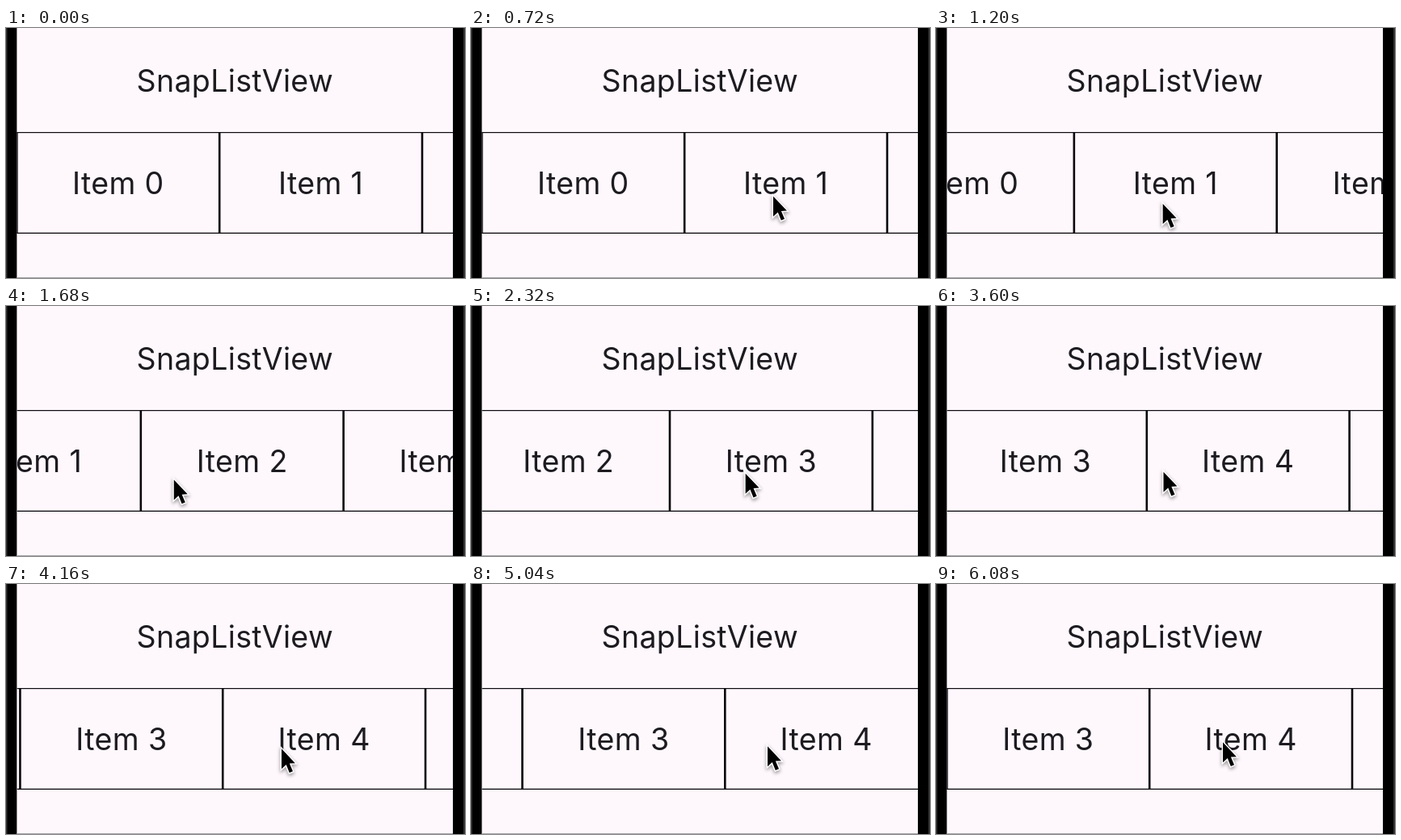
An HTML page with a canvas for the animation above (6560 ms loop, 568x310 px).

```html
<!DOCTYPE html>
<html lang="en">
<head>
<meta charset="utf-8">
<title>SnapListView</title>
<style>
html, body { margin: 0; width: 100%; height: 100%; overflow: hidden; background: #000; }
canvas { display: block; }
</style>
</head>
<body>
<canvas id="stage" width="568" height="310"></canvas>
<script>
const ctx = document.getElementById('stage').getContext('2d');
const LOOP = 6560, STEP = 80, LAST = 6080;
const LEFT = 13.4, RIGHT = 553, WIDTH = RIGHT - LEFT;
const TOP = 129, BOTTOM = 255, ITEM = 250.8;
const SURFACE = '#fef8fd', INK = '#1d1b20', LINE = '#0a080c';

// Each drag starts at pointer x, moves dx, holds, then snaps to an item edge.
const drags = [
  { at: 800, x: 374, move: 720, hold: 0, dx: -168, snap: 2, tau: 206 },
  { at: 2240, x: 368, move: 240, hold: 0, dx: -85, snap: 3, tau: 140 },
  { at: 3520, x: 285, move: 160, hold: 80, dx: -7, snap: 3, tau: 140 },
  { at: 3760, x: 278, move: 160, hold: 0, dx: 65, snap: 3, tau: 90 },
  { at: 4480, x: 317, move: 400, hold: 160, dx: 50, snap: 3, tau: 125 }
];
const ENTER = { at: 80, end: 640, x: 269, y: 298 };
const REST = { at: LAST, x: 355 };

const mix = (a, b, k) => a + (b - a) * k;
const clamp = k => Math.max(0, Math.min(1, k));
const progress = (t, from, to) => clamp((t - from) / (to - from));
const releaseOf = d => d.at + d.move + d.hold;

function scrollAt(t) {
  let scroll = 0;
  drags.forEach((d, i) => {
    if (t < d.at) return;
    const end = Math.min(t, drags[i + 1]?.at ?? LOOP);
    scroll -= d.dx * progress(end, d.at, d.at + d.move);
    const age = Math.max(0, end - releaseOf(d));
    scroll = mix(scroll, d.snap * ITEM, 1 - Math.exp(-age / d.tau));
  });
  return scroll;
}

function pointerX(t) {
  const i = drags.findLastIndex(d => d.at <= t);
  if (i < 0) return drags[0].x;
  const d = drags[i], next = drags[i + 1] ?? REST, release = releaseOf(d);
  if (t <= release) return d.x + d.dx * progress(t, d.at, d.at + d.move);
  return mix(d.x + d.dx, next.x, progress(t, release, next.at) ** 3);
}

function pointerY(t) {
  const drift = 12 * progress(t, 720, LAST) ** 2.5;
  const dip = 13 * Math.exp(-(((t - 1400) / 370) ** 2));
  return 206 - drift + dip;
}

function pointerAt(t) {
  const k = 1 - (1 - progress(t, ENTER.at, ENTER.end)) ** 2;
  return [mix(ENTER.x, pointerX(t), k), mix(ENTER.y, pointerY(t), k)];
}

function rect(color, x, y, w, h) {
  ctx.fillStyle = color;
  ctx.fillRect(x, y, w, h);
}

function label(text, x, y) {
  ctx.fillStyle = INK;
  ctx.font = '400 37.5px Inter, Roboto, sans-serif';
  ctx.letterSpacing = '0.37px';
  ctx.textAlign = 'center';
  ctx.fillText(text, x, y);
}

function drawList(scroll) {
  ctx.save();
  ctx.beginPath();
  ctx.rect(LEFT, TOP, WIDTH, BOTTOM - TOP);
  ctx.clip();
  for (let i = 0; i < 8; i++) {
    const x = LEFT + i * ITEM - scroll;
    rect(LINE, x - 1.3, TOP, 2.6, BOTTOM - TOP);
    label('Item ' + i, x + ITEM / 2, 206);
  }
  rect(LINE, LEFT, TOP, WIDTH, 1.2);
  rect(LINE, LEFT, BOTTOM - 1.3, WIDTH, 1.3);
  ctx.restore();
}

function drawPointer([x, y]) {
  ctx.save();
  ctx.translate(x, y + 2.3);
  ctx.scale(0.96, 0.96);
  const arrow = new Path2D('M0 0V26L6 20.6L10.2 31L14.6 29.2L10.3 19L17.6 18.6Z');
  ctx.lineWidth = 3;
  ctx.strokeStyle = '#fff';
  ctx.shadowColor = 'rgba(0,0,0,.45)';
  ctx.shadowBlur = 4;
  ctx.shadowOffsetY = 2;
  ctx.stroke(arrow);
  ctx.shadowColor = 'transparent';
  ctx.fillStyle = '#000';
  ctx.fill(arrow);
  ctx.restore();
}

function draw(now) {
  const t = Math.min(LAST, Math.floor(now % LOOP / STEP) * STEP);
  rect('#000', 0, 0, 568, 310);
  rect('#343434', 0, 0, 1.5, 310);
  rect('#343434', 566, 0, 2, 310);
  rect(SURFACE, LEFT, 0, WIDTH, 310);
  rect('#aaa5aa', LEFT, 309, WIDTH, 1);
  label('SnapListView', 283.2, 79);
  drawList(scrollAt(t));
  if (t >= ENTER.at) drawPointer(pointerAt(t));
}

const start = performance.now();
function tick() {
  draw(performance.now() - start);
  requestAnimationFrame(tick);
}
tick();
</script>
</body>
</html>
```
